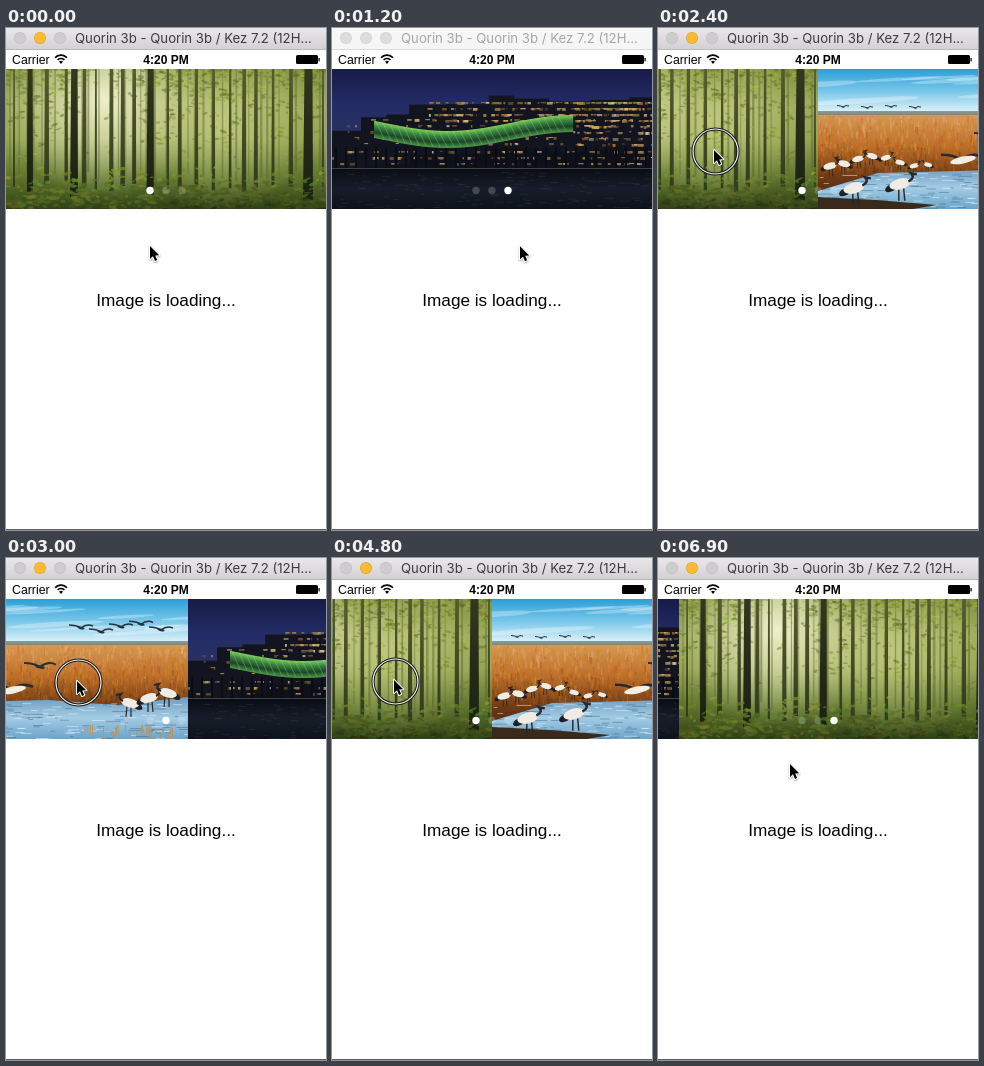
These frames come from a looping animation (320x502 px, 7200 ms). An HTML page with a canvas:

```html
<!DOCTYPE html>
<html lang="en">
<head>
<meta charset="utf-8">
<title>Image carousel</title>
<style>
html, body { margin: 0; width: 100%; height: 100%; overflow: hidden; background: #fff; }
canvas { display: block; width: 320px; height: 502px; }
</style>
</head>
<body>
<canvas id="stage"></canvas>
<script>
const W = 320, H = 502, TOP = 41, PHOTO_H = 140;
const STEP = 300, LOOP = 7200;
const SANS = '"Liberation Sans", Arial, sans-serif';
const canvas = document.getElementById('stage');
const dpr = window.devicePixelRatio || 1;
canvas.width = W * dpr;
canvas.height = H * dpr;
const ctx = canvas.getContext('2d');
ctx.scale(dpr, dpr);

// Start of each page change, in steps; every one lasts SLIDE steps
const SLIDE = 2;
const autoSlides = [1, 4, 20, 21.51];
const dragSlides = [7, 9.14, 12, 15];
// Pointer path: step, x, y
const path = [
  [0, 144, 218], [2, 173, 257], [3, 175, 261], [6, 214, 133], [7, 214, 131],
  [8, 56, 122], [9, 209, 122], [10, 71, 123], [12, 204, 120], [13, 43, 117],
  [15, 204, 120], [16, 62, 122], [19, 128, 195], [21, 132, 206], [24, 132, 206]
];

const clamp = v => Math.min(1, Math.max(0, v));
const mix = (a, b, t) => a + (b - a) * t;
const easeOut = t => 1 - (1 - t) ** 2;
const progress = (step, start) => clamp((step - start) / SLIDE);

function scrollAt(step) {
  const first = step > 0 ? 1 : 0;
  const auto = autoSlides.reduce((sum, s) => sum + easeOut(progress(step, s)), first);
  return dragSlides.reduce((sum, s) => sum + progress(step, s), auto);
}

function pointerAt(step) {
  const i = path.findIndex(p => p[0] > step);
  const [s0, x0, y0] = path[i - 1], [s1, x1, y1] = path[i];
  const t = (step - s0) / (s1 - s0);
  return [mix(x0, x1, t), mix(y0, y1, t)];
}

function isTouching(step) {
  return dragSlides.some(s => Math.abs(progress(step, s) - 0.5) < 0.3);
}

function random(seed) {
  return () => {
    seed = (seed * 1664525 + 1013904223) >>> 0;
    return seed / 4294967296;
  };
}

function photo(paint, seed) {
  const c = document.createElement('canvas');
  c.width = W * dpr;
  c.height = PHOTO_H * dpr;
  const g = c.getContext('2d');
  g.scale(dpr, dpr);
  paint(g, random(seed));
  return c;
}

function fade(g, y0, y1, colors) {
  const f = g.createLinearGradient(0, y0, 0, y1);
  colors.forEach((c, i) => f.addColorStop(i / (colors.length - 1), c));
  return f;
}

function band(g, y0, y1, colors) {
  g.fillStyle = fade(g, y0, y1, colors);
  g.fillRect(0, y0, W, y1 - y0);
}

function blob(g, x, y, rx, ry, color, tilt = 0) {
  g.fillStyle = color;
  g.beginPath();
  g.ellipse(x, y, rx, ry, tilt, 0, Math.PI * 2);
  g.fill();
}

function glow(g, x, y, r, rgb, alpha) {
  const f = g.createRadialGradient(x, y, 0, x, y, r);
  f.addColorStop(0, `rgba(${rgb},${alpha})`);
  f.addColorStop(1, `rgba(${rgb},0)`);
  g.fillStyle = f;
  g.fillRect(0, 0, W, PHOTO_H);
}

function shape(g, points, color) {
  g.fillStyle = color;
  g.beginPath();
  points.forEach(([x, y]) => g.lineTo(x, y));
  g.fill();
}

function trunk(g, x, w, base, colors) {
  shape(g, [[x - w * 0.35, 0], [x + w * 0.45, 0], [x + w * 0.5, base], [x - w * 0.5, base]],
    fade(g, 0, base, colors));
}

function paintForest(g, rnd) {
  band(g, 0, PHOTO_H, ['#82933f', '#a0ad5c', '#97a653', '#64792f', '#2f4116']);
  glow(g, 98, 30, 100, '246,246,214', 0.9);
  glow(g, 215, 55, 90, '214,220,150', 0.6);
  for (let x = 4; x < W; x += 5 + rnd() * 9) {
    trunk(g, x, 1 + rnd() * 2, 100 + rnd() * 15, ['#6b753f88', '#59652f88']);
  }
  // Leaves are thickest along the top, thinner in the light gap
  for (let i = 0; i < 900; i++) {
    const x = rnd() * W, y = rnd() * rnd() * 110;
    if (Math.abs(x - 100) < 35 && rnd() < 0.75) continue;
    blob(g, x, y, 1 + rnd() * 3, 0.6 + rnd(),
      `hsla(${62 + rnd() * 20},50%,${22 + rnd() * 30}%,0.45)`, rnd() - 0.5);
  }
  for (let x = 8; x < W; x += 11 + rnd() * 9) {
    trunk(g, x, 2 + rnd() * 3, 112 + rnd() * 12, ['#565b30', '#444c25', '#2f3b1c']);
  }
  [[24, 6], [68, 8], [144, 7], [302, 10]].forEach(([x, w]) =>
    trunk(g, x, w, 112 + w * 2, ['#343820', '#262b18', '#1a2112']));
  for (let i = 0; i < 600; i++) {
    const x = rnd() * W, y = 98 + Math.sqrt(rnd()) * 42;
    const light = mix(34, x > 150 ? 10 : 16, (y - 98) / 42) + rnd() * 12;
    blob(g, x, y, 1 + rnd() * 4, 0.6 + rnd() * 1.4,
      `hsla(${62 + rnd() * 30},50%,${light}%,0.7)`, rnd() - 0.5);
  }
}

function flyer(g, x, y, s, color = '#263238') {
  g.strokeStyle = color;
  g.lineWidth = Math.max(1, s / 8);
  g.beginPath();
  g.moveTo(x - s, y - s * 0.25);
  g.quadraticCurveTo(x - s * 0.4, y - s * 0.25, x, y);
  g.quadraticCurveTo(x + s * 0.5, y - s * 0.4, x + s, y - s * 0.15);
  g.stroke();
  blob(g, x, y, s * 0.3, s * 0.1, color, 0.2);
}

function crane(g, x, y, s, dir = 1) {
  g.save();
  g.translate(x, y);
  g.scale(s * dir, s);
  g.strokeStyle = '#28282a';
  g.lineWidth = 1.2;
  g.beginPath();
  g.moveTo(-1, 3); g.lineTo(-1, 14);
  g.moveTo(3, 3); g.lineTo(4, 14);
  g.stroke();
  blob(g, -7, 3, 6, 3, '#202126', -0.5);
  blob(g, 0, 0, 9, 4.5, '#f0ece4', -0.25);
  g.lineWidth = 2;
  g.beginPath();
  g.moveTo(7, -2);
  g.quadraticCurveTo(13, -5, 9, -9);
  g.lineTo(14, -8);
  g.stroke();
  g.restore();
}

function paintMarsh(g, rnd) {
  band(g, 0, 46, ['#2a9fd8', '#7cc8ea', '#eef8fb']);
  for (let i = 0; i < 14; i++) {
    blob(g, rnd() * W, 8 + rnd() * 25, 20 + rnd() * 40, 1 + rnd() * 2, 'rgba(255,255,255,0.3)', -0.06);
  }
  band(g, 42, 48, ['#7d9fa6', '#8d7754']);
  band(g, 46, PHOTO_H, ['#d39a55', '#bd6f2b', '#6f3712', '#3c2410']);
  for (let i = 0; i < 1500; i++) {
    const depth = rnd();
    g.fillStyle = `hsla(${22 + rnd() * 14},68%,${mix(50, 18, depth) + rnd() * 22}%,0.6)`;
    g.fillRect(rnd() * W, 46 + depth * 56, 0.7 + rnd() * 1.3, 2 + rnd() * 6);
  }
  shape(g, [[60, 104], [180, 101], [250, 106], [W, 98], [W, PHOTO_H], [0, PHOTO_H], [0, 122]],
    fade(g, 98, 140, ['#6d9cc0', '#a3cbe4', '#6ba4c9']));
  for (let i = 0; i < 200; i++) {
    g.fillStyle = rnd() < 0.5 ? 'rgba(238,248,252,0.6)' : 'rgba(40,88,125,0.5)';
    g.fillRect(rnd() * W, 104 + rnd() * 36, 3 + rnd() * 12, 0.8);
  }
  shape(g, [[0, 128], [58, 131], [119, 136], [95, PHOTO_H], [0, PHOTO_H]], '#3a2a1c');
  for (let i = 0; i < 45; i++) {
    g.fillStyle = '#bb9561';
    g.fillRect(210 + rnd() * 95, 125 + rnd() * 14, 1, 3 + rnd() * 8);
  }
  for (let i = 0; i < 4; i++) flyer(g, 25 + i * 24, 38 + i % 2, 6);
  for (let i = 0; i < 5; i++) flyer(g, 213 + i * 20, 29 + 4 * Math.sin(i * 1.7), 12);
  for (let i = 0; i < 8; i++) crane(g, 12 + i * 14, 92 + 5 * Math.cos(i), 0.75 - i * 0.04, i % 2 ? -1 : 1);
  for (let i = 0; i < 3; i++) crane(g, 262 + i * 19, 104 - i * 5, 1, i % 2 ? 1 : -1);
  for (let i = 0; i < 2; i++) crane(g, 36 + i * 46, 119 - i * 4, 1.2);
  flyer(g, 172, 68, 16);
  flyer(g, 144, 91, 21, '#292a2c');
  blob(g, 145, 91, 13, 3.5, '#f3eee4', -0.2);
}

function windows(g, rnd, count, y0, y1, left) {
  for (let i = 0; i < count; i++) {
    const x = left + rnd() * (W - left);
    const y = y0 + Math.floor(rnd() * (y1 - y0) / 6) * 6;
    g.fillStyle = `hsla(${25 + rnd() * 22},${30 + rnd() * 40}%,${35 + rnd() * 40}%,${0.3 + rnd() * 0.6})`;
    g.fillRect(x, y, 1 + rnd() * 5, 1 + rnd() * 2);
  }
}

function paintNight(g, rnd) {
  band(g, 0, 70, ['#171b47', '#232c66', '#2a3260']);
  band(g, 70, PHOTO_H, ['#11131d', '#0d1018', '#12161f', '#0b0e16']);
  // Roofs climb from left to right
  for (let x = 0, w; x < W; x += w) {
    w = 22 + rnd() * 26;
    g.fillStyle = '#12141f';
    g.fillRect(x, 58 - 32 * easeOut(clamp(x / 170)) + rnd() * 7, w + 1, 50);
  }
  windows(g, rnd, 210, 33, 57, 95);
  windows(g, rnd, 90, 50, 80, 10);
  windows(g, rnd, 120, 33, 78, 242);
  windows(g, rnd, 110, 82, 99, 0);
  g.fillStyle = '#090c14';
  for (let x = 3; x < W; x += 10) g.fillRect(x, 78, 2, 23);
  g.fillStyle = '#3f423e';
  g.fillRect(0, 99, W, 1);
  band(g, 100, PHOTO_H, ['#0a0d15', '#161d2a', '#0d121b']);

  const wave = x => 62 + 8 * Math.cos((x - 115) / 40);
  for (let x = 42; x < 241; x++) {
    const y = wave(x);
    g.fillStyle = fade(g, y - 8, y + 9, ['#7fce5c', '#37813f', '#1c4429', '#4d9a48']);
    g.fillRect(x, y - 8, 1.2, 17);
  }
  g.lineWidth = 0.7;
  g.strokeStyle = 'rgba(170,235,120,0.45)';
  g.beginPath();
  for (let x = 44; x < 232; x += 7) {
    g.moveTo(x, wave(x) - 8);
    g.lineTo(x + 8, wave(x + 8) + 8);
  }
  g.stroke();
  for (let i = 0; i < 130; i++) {
    g.fillStyle = rnd() < 0.3 ? 'rgba(52,89,61,0.35)' : 'rgba(88,95,108,0.22)';
    g.fillRect(rnd() * W, 103 + rnd() * 36, 2 + rnd() * 8, 0.8);
  }
}

const photos = [photo(paintForest, 17), photo(paintMarsh, 42), photo(paintNight, 91)];

function text(str, x, y, font, color, align = 'left') {
  ctx.font = font;
  ctx.fillStyle = color;
  ctx.textAlign = align;
  ctx.fillText(str, x, y);
}

function drawTitle(active) {
  band(ctx, 0, 22, active ? ['#e9e7e9', '#d2d0d2'] : ['#f7f7f7', '#f5f5f5']);
  ctx.fillStyle = active ? '#b9b8b9' : '#dadada';
  ctx.fillRect(0, 21, W, 1);
  for (let i = 0; i < 3; i++) {
    const x = 14 + i * 20, lit = active && i === 1;
    blob(ctx, x, 10, 6, 6, lit ? '#e2a12c' : active ? '#bdbcbd' : '#d2d2d2');
    blob(ctx, x, 10, 5.4, 5.4, lit ? '#fdb934' : active ? '#cecdce' : '#dcdcdc');
  }
  text('Quorin 3b - Quorin 3b / Kez 7.2 (12H...', 69, 15, '13.2px Inter, sans-serif', active ? '#3c3c3c' : '#a6a6a6');
}

function drawStatus(clock) {
  text('Carrier', 6, 36, `12.3px ${SANS}`, '#000');
  text(clock, 160, 36, `bold 12px ${SANS}`, '#000', 'center');
  ctx.strokeStyle = '#000';
  ctx.lineWidth = 1.7;
  for (const r of [4.5, 7.9]) {
    ctx.beginPath();
    ctx.arc(55, 35, r, -Math.PI * 0.77, -Math.PI * 0.23);
    ctx.stroke();
  }
  shape(ctx, [[55, 36], [53, 33.6], [55, 32.8], [57, 33.6]], '#000');
  ctx.beginPath();
  ctx.roundRect(290, 27, 22, 9, 1.5);
  ctx.fill();
  ctx.fillRect(312.5, 30, 1.2, 3.4);
}

function drawCarousel(pos) {
  const page = Math.floor(pos);
  const x = -Math.round((pos - page) * W);
  ctx.drawImage(photos[page % 3], x, TOP, W, PHOTO_H);
  if (x) ctx.drawImage(photos[(page + 1) % 3], x + W, TOP, W, PHOTO_H);
  for (let i = 0; i < 3; i++) {
    blob(ctx, 144 + i * 16, 162.5, 3.7, 3.7, i === page % 3 ? '#fff' : 'rgba(255,255,255,0.2)');
  }
}

function drawPointer(x, y, touch) {
  if (touch) {
    ctx.beginPath();
    ctx.arc(x + 1.5, y + 1.5, 22.5, 0, Math.PI * 2);
    ctx.strokeStyle = '#15191a';
    ctx.lineWidth = 3.2;
    ctx.stroke();
    ctx.strokeStyle = '#f4f4f4';
    ctx.lineWidth = 1.2;
    ctx.stroke();
  }
  ctx.save();
  ctx.translate(x, y);
  ctx.beginPath();
  [[0, 0], [0, 13], [3, 10.3], [5, 15], [7.2, 14], [5.2, 9.4], [9.2, 9.2]]
    .forEach(([px, py]) => ctx.lineTo(px, py));
  ctx.closePath();
  ctx.lineJoin = 'round';
  ctx.strokeStyle = '#fff';
  ctx.lineWidth = 2;
  ctx.shadowColor = 'rgba(0,0,0,0.35)';
  ctx.shadowBlur = 2 * dpr;
  ctx.shadowOffsetY = dpr;
  ctx.stroke();
  ctx.shadowColor = 'transparent';
  ctx.fillStyle = '#000';
  ctx.fill();
  ctx.restore();
}

function draw(now) {
  const step = Math.floor((now % LOOP) / STEP);
  ctx.fillStyle = '#fff';
  ctx.fillRect(0, 0, W, H);
  drawTitle(step === 0 || step >= 7);
  drawStatus(step === 1 || step === 2 ? '4:19 PM' : '4:20 PM');
  drawCarousel(scrollAt(step));
  text('Image is loading...', 160, 278, `17.2px ${SANS}`, '#000', 'center');
  ctx.fillStyle = '#5c5c5c';
  ctx.fillRect(0, 501, W, 1);
  drawPointer(...pointerAt(step), isTouching(step));
}

let start;
function tick(now) {
  start ??= now;
  draw(now - start);
  requestAnimationFrame(tick);
}
draw(0);
requestAnimationFrame(tick);
</script>
</body>
</html>
```
